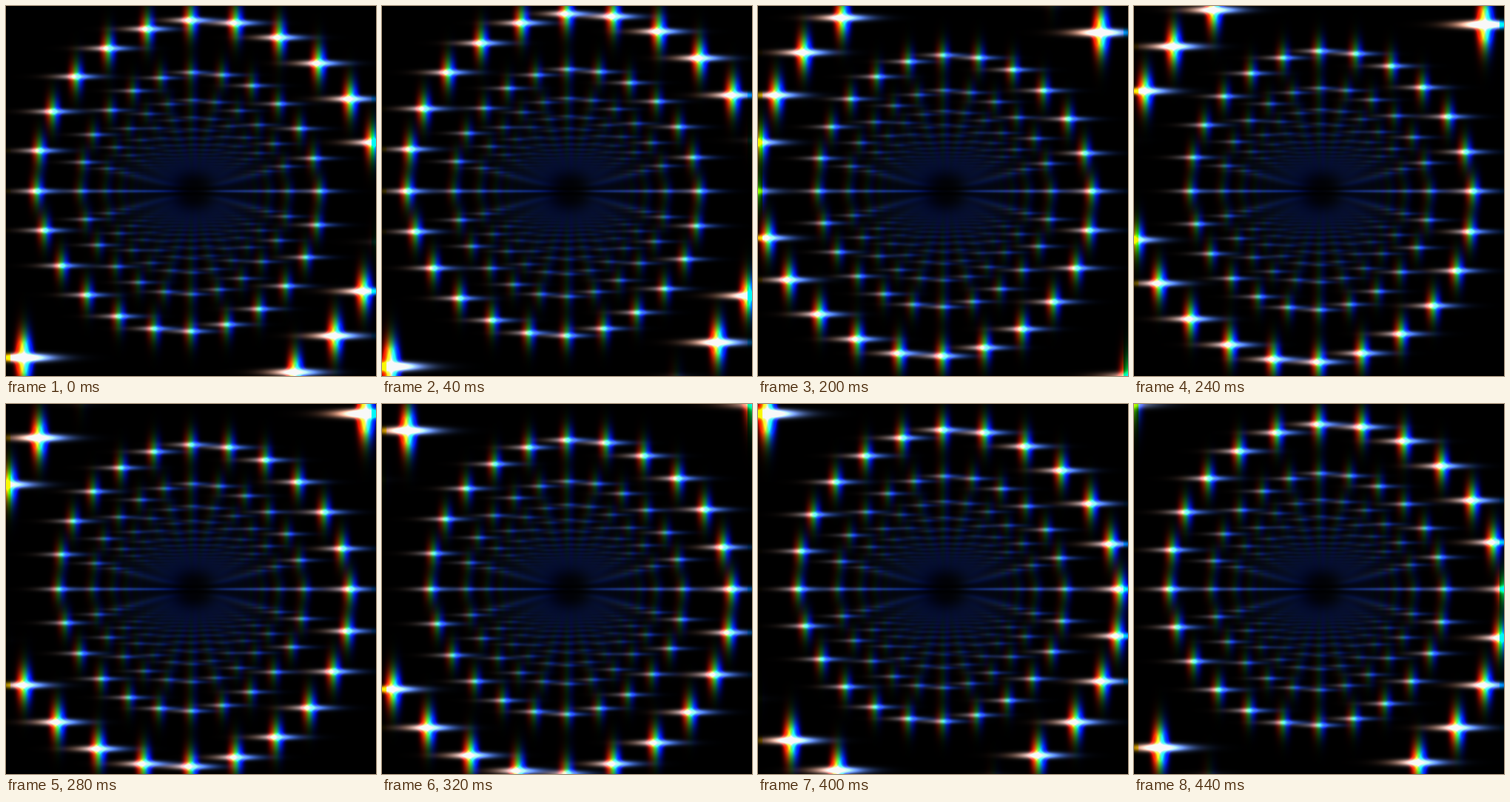
An HTML page with a canvas for the animation above (0.48 s loop, 500x500 px).

```html
<!DOCTYPE html>
<html lang="en">
<head>
<meta charset="utf-8">
<title>Star spiral</title>
<style>
  html, body { margin: 0; width: 100%; height: 100%; overflow: hidden; background: #000; }
  canvas { display: block; width: 500px; height: 500px; }
</style>
</head>
<body>
<canvas id="stage" width="500" height="500"></canvas>
<script>
const SIZE = 500, STEPS = 12, STEP_MS = 40;
const CX = 249.3, CY = 249.7;
const PER_TURN = 24;
const DEPTH_0 = 0.00433, DEPTH_STEP = 0.0000792;

// Colour fringe: red slides left, blue slides right.
const CHANNELS = [
  { shift: -6, gain: 0.26, power: 3.5 },
  { shift: 0, gain: 0.36, power: 3 },
  { shift: 6, gain: 0.6, power: 2.5 }
];

const ctx = document.getElementById('stage').getContext('2d');
const light = new Float32Array(SIZE * SIZE);
const frames = [];

function clamp(v, min, max) {
  return Math.min(max, Math.max(min, v));
}

function smoothstep(a, b, v) {
  const t = clamp((v - a) / (b - a), 0, 1);
  return t * t * (3 - 2 * t);
}

// Samples a falloff around a centre, clipped to [min, max).
function profile(center, length, power, reach, min, max) {
  const start = Math.max(min, Math.ceil(center - reach));
  const end = Math.min(max, Math.floor(center + reach) + 1);
  const values = [];
  for (let i = start; i < end; i++) {
    values.push(Math.exp(-Math.pow(Math.abs(i - center) / length, power)));
  }
  return { start, values };
}

function addArm(cols, rows, amount) {
  rows.values.forEach((v, j) => {
    const base = (rows.start + j) * SIZE + cols.start;
    const a = v * amount;
    for (let i = 0; i < cols.values.length; i++) light[base + i] += a * cols.values[i];
  });
}

// Only the part of a star inside the stage glows.
function visiblePart(v, radius) {
  return smoothstep(-radius, radius, Math.min(v, SIZE - v));
}

function starsAt(step) {
  const stars = [];
  for (let k = -30; k < 900; k++) {
    const depth = DEPTH_0 + (k - step * PER_TURN / STEPS) * DEPTH_STEP;
    if (depth < 0.0022) continue;
    const r = 1 / depth;
    if (r < 15) break;
    const angle = k * 2 * Math.PI / PER_TURN;
    const x = CX - r * Math.sin(angle), y = CY - r * Math.cos(angle);
    const dot = r * 0.027;
    const glow = visiblePart(x, dot) * visiblePart(y, dot) * smoothstep(14, 42, r);
    if (glow > 0) stars.push({ x: clamp(x, 0, SIZE), y: clamp(y, 0, SIZE), r, glow });
  }
  return stars;
}

function drawStar({ x, y, r, glow }, { shift, gain, power }) {
  const amount = glow * gain * Math.pow(r / 160, power);
  const thin = Math.hypot(1.7, 0.015 * r);
  const wide = Math.hypot(4.2, 0.013 * r);
  const across = Math.hypot(16, 0.075 * r);
  const tall = Math.hypot(11, 0.06 * r);
  const min = Math.max(0, shift), max = SIZE + Math.min(0, shift);
  const cx = x + shift;
  addArm(profile(cx, across, 1.4, across * 4, min, max),
         profile(y, thin, 2, thin * 3, 0, SIZE), amount * Math.sqrt(200 / r));
  addArm(profile(cx, wide, 2, wide * 3, min, max),
         profile(y, tall, 1.4, tall * 4, 0, SIZE), amount * 0.9);
}

function render(step) {
  const image = ctx.createImageData(SIZE, SIZE);
  const stars = starsAt(step);
  CHANNELS.forEach((channel, c) => {
    light.fill(0);
    stars.forEach(star => drawStar(star, channel));
    for (let i = 0; i < light.length; i++) {
      image.data[i * 4 + c] = Math.min(1, light[i]) * 248;
    }
  });
  for (let i = 3; i < image.data.length; i += 4) image.data[i] = 255;
  return image;
}

let shown = -1;
let begin = null;

function show(step) {
  if (step === shown) return;
  ctx.putImageData(frames[step], 0, 0);
  shown = step;
}

function tick(now) {
  if (begin === null) begin = now;
  show(Math.floor((now - begin) / STEP_MS) % STEPS);
  requestAnimationFrame(tick);
}

for (let step = 0; step < STEPS; step++) frames.push(render(step));
show(0);
requestAnimationFrame(tick);
</script>
</body>
</html>
```
